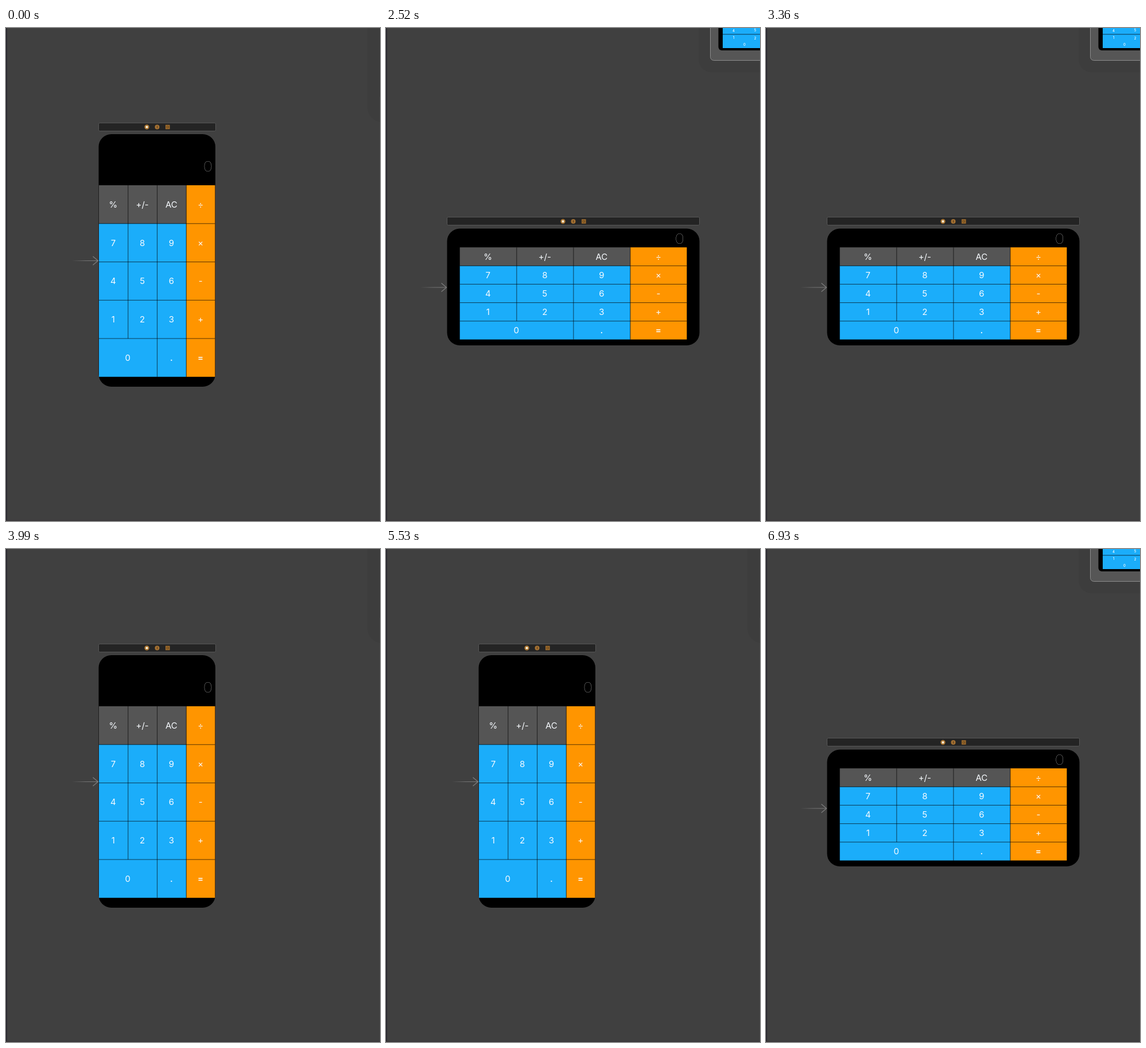
An HTML page with a canvas that plays this animation: 652 by 859 pixels, repeating every 8 s.

```html
<!DOCTYPE html>
<html lang="en">
<head>
<meta charset="utf-8">
<title>Calculator layout</title>
<style>
html, body { margin: 0; width: 652px; height: 859px; overflow: hidden; background: #404040; }
canvas { display: block; }
</style>
</head>
<body>
<canvas id="stage" width="652" height="859"></canvas>
<script>
const ctx = document.getElementById('stage').getContext('2d');
const LOOP = 8000;
const KEY_FONT = 'Inter, "Liberation Sans", sans-serif';
const VALUE_FONT = 'Lato, Inter, sans-serif';
const BLUE = '#1badfa', ORANGE = '#ff9500', GRAY = '#555555';

// Times at which the device turns; it starts upright
const TURNS = [1680, 2590, 3290, 3990, 4620, 5530, 6160];

const ROWS = [
  ['%', '+/-', 'AC', '÷'],
  ['7', '8', '9', '×'],
  ['4', '5', '6', '-'],
  ['1', '2', '3', '+'],
  ['0', '', '.', '=']
];

const PORTRAIT = {
  bar: [161.5, 165.5, 204, 14], icons: [245.5, 172.5],
  body: [161.5, 185, 203.5, 440], grid: [162, 274, 50.75, 66.75], right: 364.4,
  value: [352, 241], arrow: [115, 160.5, 405.5]
};
const LANDSCAPE = {
  bar: [106.5, 329.5, 440, 14], icons: [308.5, 337],
  body: [106.5, 349.5, 440, 203.5], grid: [128.7, 382.2, 99.05, 32.1], right: 524.4,
  value: [511.8, 366.5], arrow: [60, 105.5, 452]
};

function rect(x, y, w, h, fill) {
  ctx.fillStyle = fill;
  ctx.fillRect(x, y, w, h);
}

function round(x, y, w, h, r, fill, stroke) {
  ctx.beginPath();
  ctx.roundRect(x, y, w, h, r);
  if (fill) { ctx.fillStyle = fill; ctx.fill(); }
  if (stroke) { ctx.strokeStyle = stroke; ctx.lineWidth = 1; ctx.stroke(); }
}

function disc(x, y, r, fill) {
  ctx.beginPath();
  ctx.arc(x, y, r, 0, Math.PI * 2);
  ctx.fillStyle = fill;
  ctx.fill();
}

// Centres text on x, and its capital height on y
function label(s, x, y, size, weight, fill = '#fff', font = KEY_FONT) {
  ctx.font = `${weight} ${size}px ${font}`;
  ctx.textAlign = 'center';
  ctx.fillStyle = fill;
  ctx.fillText(s, x, y + size * 0.364);
}

function drawBackdrop() {
  rect(0, 0, 652, 859, '#404040');
  rect(0, 0, 1, 859, '#222129');
  rect(1, 0, 1, 859, '#2e2d33');
  rect(0, 857.5, 652, 1.5, '#393538');
}

function drawBar([x, y, w, h], [ix, iy]) {
  round(x, y, w, h, 2, '#242424', '#575757');
  disc(ix, iy, 4.2, '#a8732f');
  rect(ix - 1.8, iy - 1.8, 3.6, 3.6, '#fff3dc');
  disc(ix + 18, iy, 4, '#a37032');
  rect(ix + 17.5, iy - 2, 1.2, 4, '#5a3d1a');
  rect(ix + 32.5, iy - 3.8, 7.6, 7.6, '#99682c');
  rect(ix + 34.2, iy - 1.8, 4, 3.6, '#694618');
  rect(ix + 35.2, iy - 0.7, 1.6, 1.4, '#b98441');
}

function drawArrow([x0, x1, y]) {
  const g = ctx.createLinearGradient(x0, 0, x1, 0);
  g.addColorStop(0, 'rgba(128,128,128,0)');
  g.addColorStop(0.5, 'rgba(128,128,128,.75)');
  g.addColorStop(1, '#808080');
  ctx.lineWidth = 1.1;
  ctx.strokeStyle = g;
  ctx.beginPath();
  ctx.moveTo(x0, y);
  ctx.lineTo(x1, y);
  ctx.stroke();
  ctx.strokeStyle = '#808080';
  ctx.beginPath();
  ctx.moveTo(x1 - 9, y - 7.5);
  ctx.lineTo(x1, y);
  ctx.lineTo(x1 - 9, y + 7.5);
  ctx.stroke();
}

function drawKeys([x, y, cw, ch], right) {
  const w = right - x;
  rect(x, y, cw * 3, ch, GRAY);
  rect(x, y + ch, cw * 3, ch * 4, BLUE);
  rect(x + cw * 3, y, w - cw * 3, ch * 5, ORANGE);

  // Hairlines sit between pixels, so they are left soft
  const line = 'rgba(0,0,0,.6)';
  for (let r = 1; r < 5; r++) rect(x, y + ch * r - 0.5, w, 1.1, line);
  for (let c = 1; c < 4; c++) {
    rect(x + cw * c - 0.5, y, 1.1, ch * (c === 1 ? 4 : 5), line);
  }

  ROWS.forEach((row, r) => row.forEach((s, c) => {
    const wide = s === '0';
    const cx = x + cw * (wide ? 1 : c + 0.5) - 0.5;
    const weight = s === '=' || s === '.' ? 600 : 400;
    label(s, cx, y + ch * (r + 0.5), 15, weight, '#f7fbff');
  }));
}

function drawDevice(d) {
  drawBar(d.bar, d.icons);
  round(...d.body, 22, '#000');
  drawKeys(d.grid, d.right);
  label('0', ...d.value, 25, 200, '#fff', VALUE_FONT);
  drawArrow(d.arrow);
}

// Floating preview whose corner reaches into the stage
function drawPreview(turned) {
  if (!turned) {
    round(630, -40, 80, 204, 26, '#3d3d3d');
    rect(651, 0, 1, 120, '#353535');
    return;
  }
  round(545, -40, 160, 117, 22, '#3d3d3d');
  round(565.5, -40, 160, 96.5, 6, '#565656', '#8b8b8b');
  round(579.5, -40, 160, 79, 6, '#000');
  rect(587, 0, 65, 35, BLUE);
  rect(587, 10.5, 65, 1, 'rgba(0,0,0,.7)');
  label('4', 606, 4.5, 6, 500);
  label('5', 643.5, 3.5, 6, 500);
  label('1', 606, 17, 6, 500);
  label('2', 643.5, 18, 6, 500);
  label('0', 625, 29, 6, 500);
}

function draw(t) {
  const turned = TURNS.filter(at => t >= at).length % 2 === 1;
  drawBackdrop();
  drawPreview(turned);
  drawDevice(turned ? LANDSCAPE : PORTRAIT);
}

let start;
function tick(now) {
  start ??= now;
  draw((now - start) % LOOP);
  requestAnimationFrame(tick);
}
draw(0);
requestAnimationFrame(tick);
</script>
</body>
</html>
```
